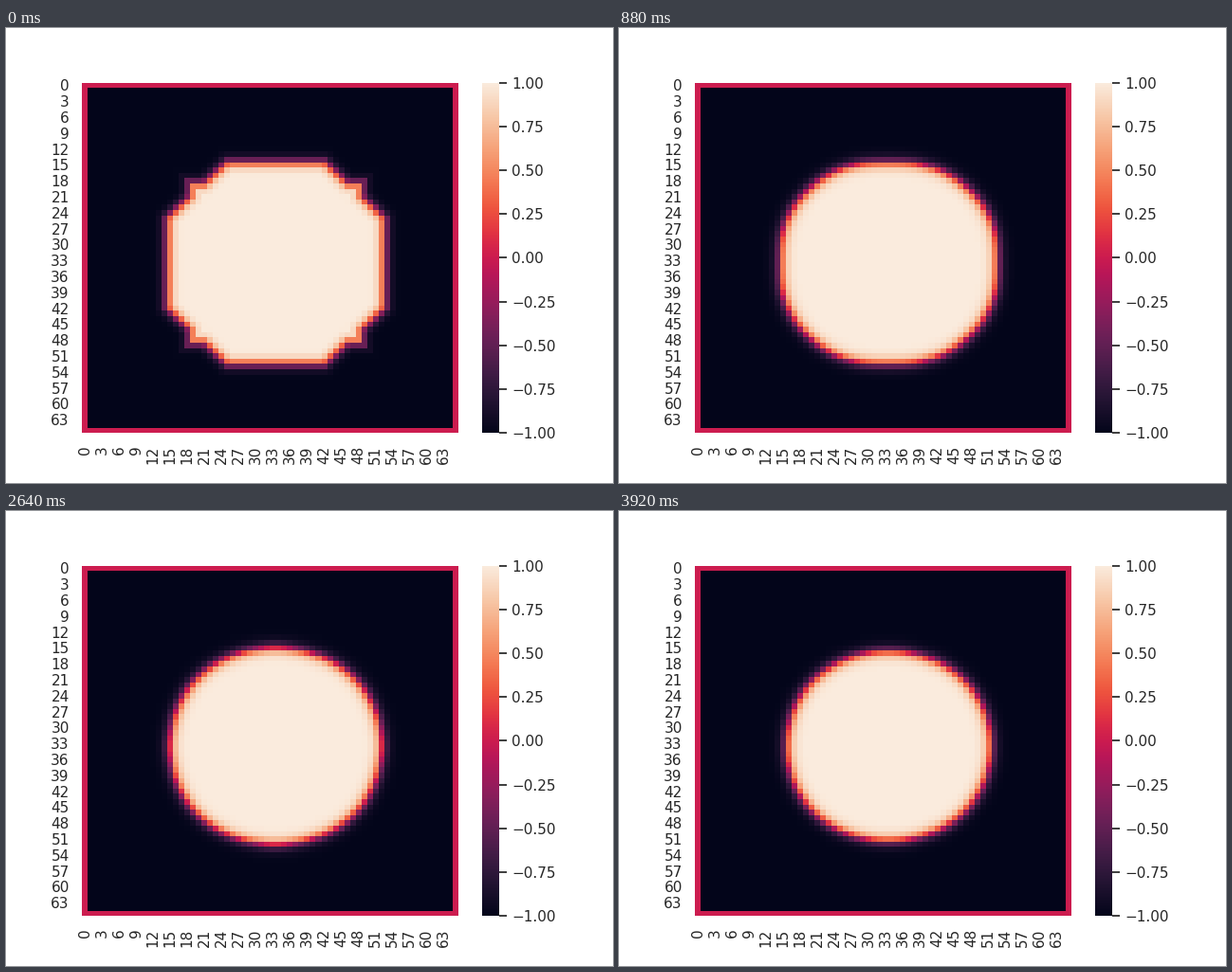
These frames come from a looping animation (640 px wide and 480 px high, 4000 ms). A matplotlib script:

```python
import matplotlib.pyplot as plt
import numpy as np
from matplotlib.animation import FuncAnimation
from matplotlib.colors import LinearSegmentedColormap

N = 66              # cells per side, including the border
FRAMES = 100
DIFFUSION = 0.42    # cells squared per frame
REACTION = 1.5
SUBSTEPS = 6
INK = "0.15"

# The picture is held between these frames.
UPDATES = [0, 1, 2, 3, 5, 7, 10, 13, 17, 18, 22, 27, 32, 35, 40, 45, 49, 54,
           55, 57, 59, 63, 66, 71, 76, 78, 83, 88, 93, 98]

plt.rcParams.update({"font.family": "DejaVu Sans", "font.size": 11})


def make_cmap():
    """Dark navy through crimson to cream."""
    sevenths = "#03051a #35193e #701f57 #ad1759 #e13342 #f37651 #f6b48f #faebdd"
    elevenths = ("#03051a #221331 #451c47 #6a1f56 #921c5b #b91657 "
                 "#d92847 #ed513e #f47c56 #f6a47b #f7c9aa #faebdd")
    stops = {1 / 4: "#611f53", 1 / 3: "#841e5a", 1 / 2: "#cb1b4f",
             2 / 3: "#f06043", 3 / 4: "#f4875e"}
    for colors in (sevenths.split(), elevenths.split()):
        last = len(colors) - 1
        stops.update({i / last: c for i, c in enumerate(colors)})
    return LinearSegmentedColormap.from_list("ember", sorted(stops.items()), N=256)


def initial_field():
    """Octagon with small square tips on its diagonals, smoothed by tanh."""
    y, x = np.mgrid[:N, :N]
    p = 19 - abs(x - 33.5)
    q = 19 - abs(y - 33.5)
    diagonal = (p + q - 10.5) / np.sqrt(2)
    tip = np.minimum(p, q) - 4
    dist = np.minimum(np.minimum(p, q), np.maximum(diagonal, tip))
    return np.tanh(dist)


def laplacian(u):
    return sum(np.roll(u, s, axis) for s in (-1, 1) for axis in (0, 1)) - 4 * u


def advance(u):
    """Allen-Cahn flow over one frame."""
    dt = DIFFUSION / SUBSTEPS
    for _ in range(SUBSTEPS):
        u = u + dt * (laplacian(u) + REACTION * u * (1 - u**2))
    return u


def with_border(u):
    return np.pad(u[1:-1, 1:-1], 1)


def simulate():
    u = initial_field()
    fields = []
    for _ in range(FRAMES):
        fields.append(with_border(u))
        u = advance(u)
    return fields


fields = simulate()

fig, ax = plt.subplots(figsize=(6.4, 4.8), dpi=100)
mesh = ax.pcolormesh(fields[0], cmap=make_cmap(), vmin=-1, vmax=1)
ax.set(xlim=(0, N), ylim=(N, 0))
ax.spines[:].set_visible(False)

labels = np.arange(0, N, 3)
ax.set_xticks(labels + 0.5, labels, rotation="vertical")
ax.set_yticks(labels + 0.5, labels)
ax.tick_params(length=0, pad=9.5, labelcolor=INK)

bar = fig.colorbar(mesh, ax=ax, ticks=np.linspace(-1, 1, 9))
bar.outline.set_linewidth(0)
bar.ax.tick_params(length=6, width=1.25, pad=3.5, color=INK, labelcolor=INK)


def draw(frame):
    shown = max(k for k in UPDATES if k <= frame)
    mesh.set_array(fields[shown])
    return [mesh]


anim = FuncAnimation(fig, draw, frames=FRAMES, interval=40, repeat=True)
plt.show()
```
